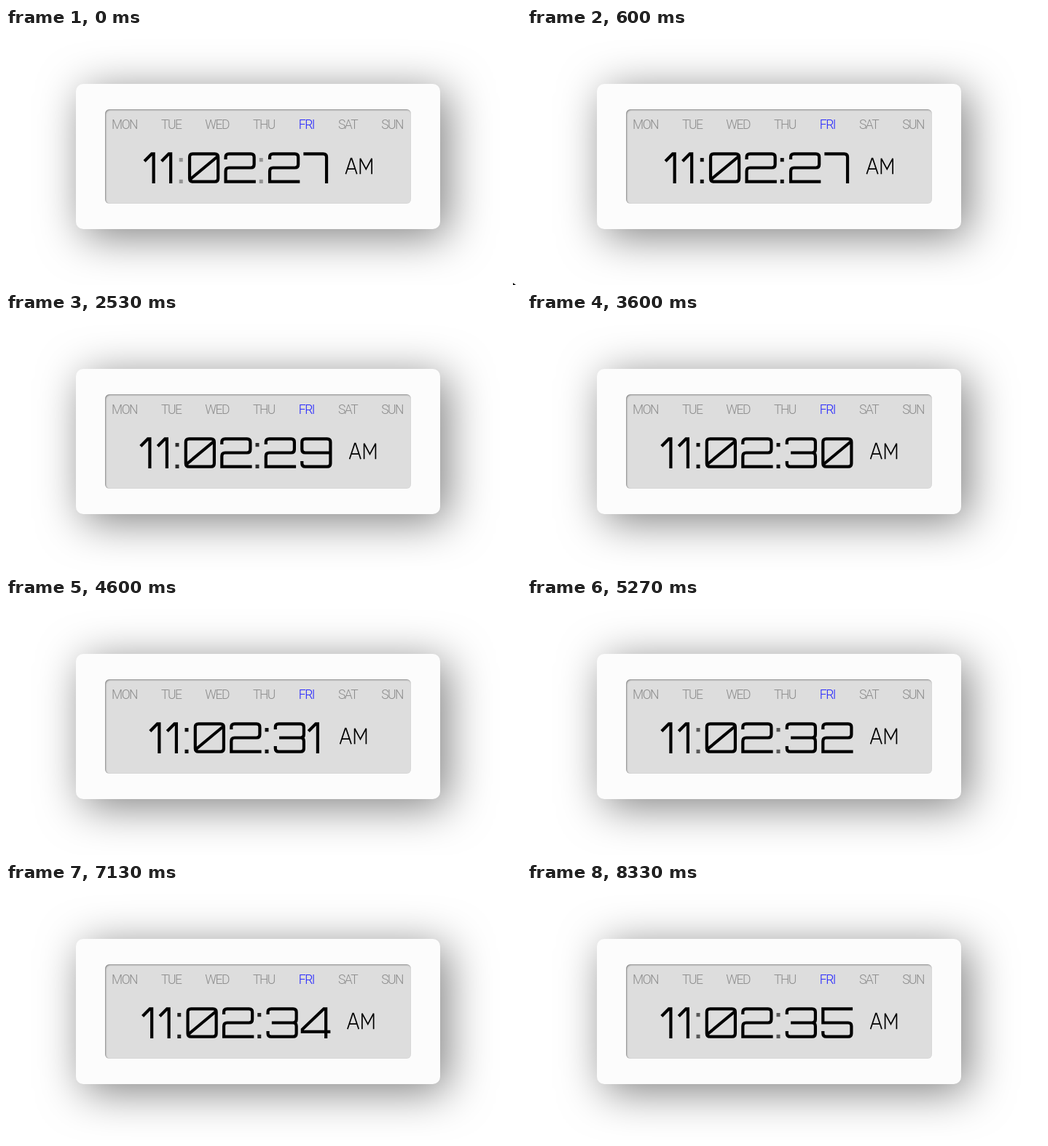
These frames come from a looping animation (707x354 px, 8390 ms). An HTML page:

```html
<!DOCTYPE html>
<html lang="en">
<head>
<meta charset="utf-8">
<title>Digital clock</title>
<style>
  html, body { margin: 0; width: 100%; height: 100%; overflow: hidden; background: #fff; }
  .card {
    position: absolute; left: 96px; top: 77px; width: 500px; height: 200px;
    border-radius: 10px; background: #fcfcfc;
    box-shadow: 10px 10px 60px rgba(0, 0, 0, .5);
  }
  .screen {
    position: absolute; left: 136px; top: 112px; width: 420px; height: 130px;
    border-radius: 6px; background: #ddd;
    box-shadow: inset 1px 1px 2px rgba(0, 0, 0, .4);
  }
  .days {
    position: absolute; left: 145px; top: 123px; width: 400px;
    display: flex; justify-content: space-between;
    font: 300 17.5px/20px Roboto, "Liberation Sans", sans-serif;
    letter-spacing: -1.5px; color: #8c8c8c;
  }
  .days .today { color: #22f; }
  svg { position: absolute; left: 0; top: 0; }
  #time { fill: none; stroke: #000; stroke-width: 4.2; }
  #time .colon { fill: #000; stroke: none; }
  #time .half { stroke-width: 1.7; }
</style>
</head>
<body>
<div class="card"></div>
<div class="screen"></div>
<div class="days">
  <span>MON</span><span>TUE</span><span>WED</span><span>THU</span><span class="today">FRI</span><span>SAT</span><span>SUN</span>
</div>
<svg width="707" height="354" role="img" aria-label="Clock">
  <g id="time"></g>
  <path id="pointer" d="M696 351L700 354H696Z"/>
</svg>
<script>
const LOOP = 8390, FRAME = 1000 / 15, CENTER = 315.6, TOP = 171;
const time = document.getElementById('time');
const pointer = document.getElementById('pointer');

// Each glyph: advance width and outline, measured from the top of the digits
const upperHook = 'M6.7 10V6.8q0-4.5 4.5-4.5H41.3q4.5 0 4.5 4.5V17q0 4.5-4.5 4.5';
const lowerBowl = 'q4.5 0 4.5 4.5V36.2q0 4.5-4.5 4.5H11.2q-4.5 0-4.5-4.5';
const glyphs = {
  0: [49.5, 'M11.2 2.3H41.3q4.5 0 4.5 4.5V36.2q0 4.5-4.5 4.5H11.2q-4.5 0-4.5-4.5V6.8q0-4.5 4.5-4.5ZM8 37L44.5 6.5'],
  1: [23.5, 'M2.7 12.5L12.7 2.3H15.3V43'],
  2: [49.5, upperHook + 'H11.2q-4.5 0-4.5 4.5V40.7H48'],
  3: [49.5, upperHook + 'H12M41.3 21.5' + lowerBowl + 'V33'],
  4: [44, 'M43 33.8H4.5V30.6L34 2.3H36.8V43'],
  5: [49.5, 'M47.5 2.3H6.7V21.5H41.3' + lowerBowl + 'V33'],
  7: [39, 'M3.5 2.3H30.7q4.5 0 4.5 4.5V43'],
  8: [49.5, 'M11.2 21.5q-4.5 0-4.5-4.5V6.8q0-4.5 4.5-4.5H41.3q4.5 0 4.5 4.5V17q0 4.5-4.5 4.5ZH41.3' + lowerBowl + 'V26q0-4.5 4.5-4.5'],
  9: [49.5, 'M45.8 21.5H11.2q-4.5 0-4.5-4.5V6.8q0-4.5 4.5-4.5H41.3q4.5 0 4.5 4.5V36.2q0 4.5-4.5 4.5H11.2q-4.5 0-4.5-4.5V33'],
  ':': [11, 'M3.4 8h5v5.3h-5zM3.4 37.7h5v5.3h-5z'],
};
const half = 'M.8 30.2L8 8.7H9L16.2 30.2M3.4 23.2H13.6M20.8 30.2V8.7L28.7 23.5L36.6 8.7V30.2';

const shape = (d, x, name) => `<path class="${name}" d="${d}" transform="translate(${x} ${TOP})"/>`;

function setTime(text) {
  const chars = [...text];
  const width = chars.reduce((sum, c) => sum + glyphs[c][0], 0);
  let x = CENTER - width / 2, out = '';
  for (const c of chars) {
    out += shape(glyphs[c][1], x, c === ':' ? 'colon' : 'digit');
    x += glyphs[c][0];
  }
  time.innerHTML = out + shape(half, x + 21.7, 'half');
}

let shown;
function draw(now) {
  const t = now % LOOP;
  let tick = (Math.floor((t + 1) / FRAME) * FRAME + 334) / 1000;
  if (t >= 7130 && t < 7668) tick = 7.85;   // the display stalls here
  const second = 27 + Math.floor(tick);
  if (second !== shown) {
    setTime('11:02:' + second);
    shown = second;
  }
  // Colons fade in over every second
  for (const colon of time.querySelectorAll('.colon')) colon.style.opacity = tick % 1;
  pointer.style.display = t < 66 ? '' : 'none';
}

const start = performance.now();
function loop() {
  draw(performance.now() - start);
  requestAnimationFrame(loop);
}
loop();
</script>
</body>
</html>
```
